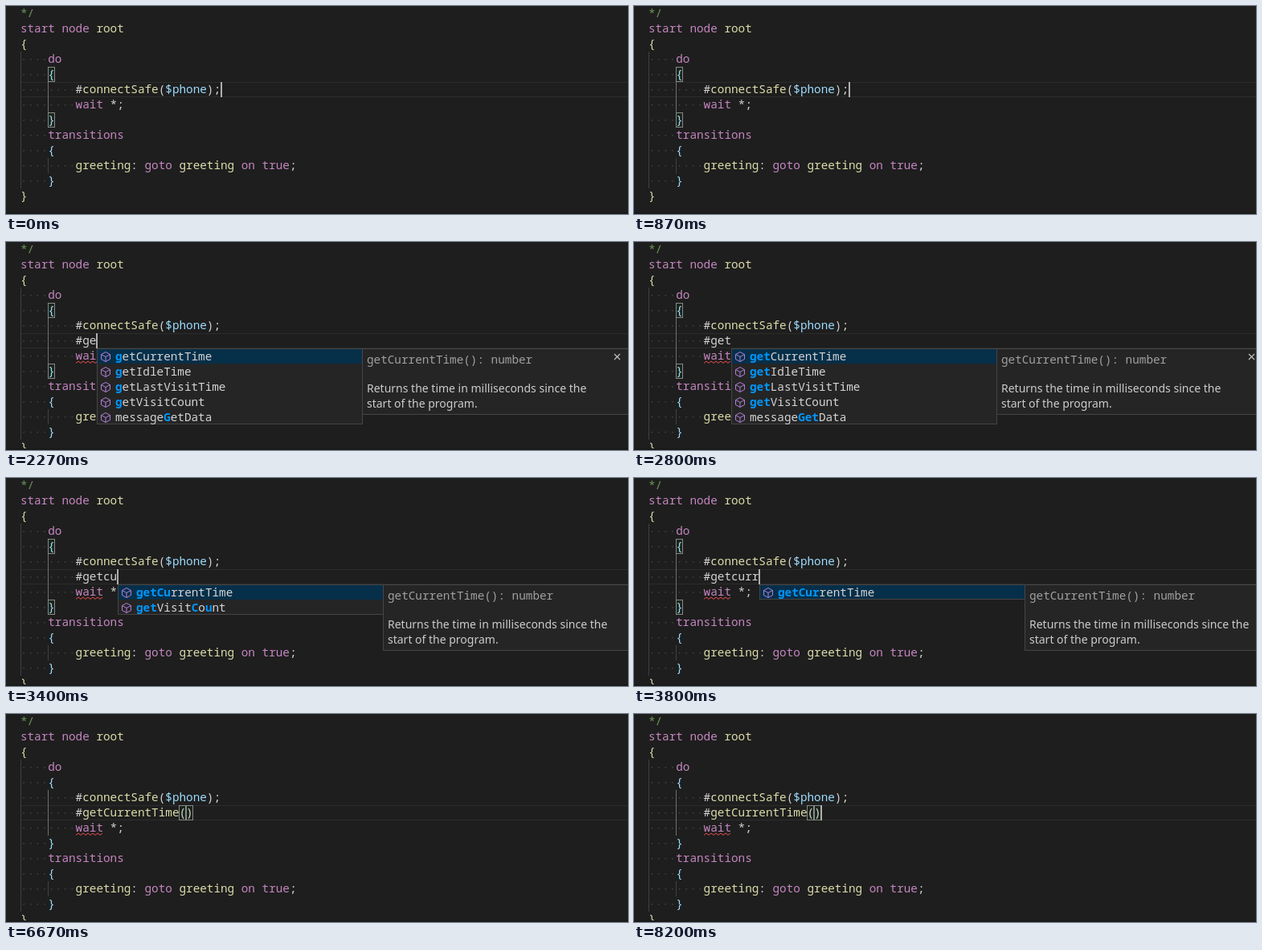
Recreate the animation shown at these times as an HTML page with a canvas. Size 774 by 260 pixels, loop 8740 ms.

```html
<!DOCTYPE html>
<html lang="en">
<head>
<meta charset="utf-8">
<title>Code completion</title>
<style>
  html, body { margin: 0; width: 100%; height: 100%; overflow: hidden; background: #1e1e1e; }
  canvas { display: block; }
</style>
</head>
<body>
<canvas id="stage" width="774" height="260"></canvas>
<script>
const ctx = document.getElementById('stage').getContext('2d');
const W = 774, H = 260, LOOP = 8740;
const X0 = 17.9, ADV = 8.59, ROW = 19, BASE = 14;
const MONO = '14.32px "Noto Sans Mono", monospace';
const SANS = '14px "Noto Sans", sans-serif';

const COLOR = {
  key: '#c586c0', fn: '#dcdcaa', va: '#9cdcfe', txt: '#d4d4d4', com: '#6a9955',
  match: '#0097fb', panel: '#252526', edge: '#454545', pick: '#062f4a'
};

// Each line: indent in columns, then [text, colour] pairs
const HEAD = [
  [0, ['*/', 'com']],
  [0, ['start node ', 'key'], ['root', 'fn']],
  [0, ['{', 'fn']],
  [4, ['do', 'key']],
  [4, ['{', 'va']],
  [8, ['#', 'txt'], ['connectSafe', 'fn'], ['(', 'txt'], ['$phone', 'va'], [');', 'txt']]
];
const TAIL = [
  [8, ['wait', 'key'], [' *;', 'txt']],
  [4, ['}', 'va']],
  [4, ['transitions', 'key']],
  [4, ['{', 'va']],
  [8, ['greeting', 'fn'], [': ', 'txt'], ['goto ', 'key'], ['greeting ', 'fn'], ['on true', 'key'], [';', 'txt']],
  [4, ['}', 'va']],
  [0, ['}', 'fn']]
];
const ITEMS = ['getCurrentTime', 'getIdleTime', 'getLastVisitTime', 'getVisitCount', 'messageGetData'];

// Time, typed text, letters already used by the suggestion filter (-1: list closed)
const STEPS = [
  [1070, '', -1], [1530, '#', -1], [1930, '#', 0],
  [2200, '#g', 0], [2270, '#ge', 1], [2330, '#get', 2], [2400, '#get', 3],
  [3270, '#getc', 3], [3330, '#getcu', 4], [3400, '#getcu', 5],
  [3600, '#getcur', 5], [3670, '#getcur', 6], [3800, '#getcurr', 6], [3870, '#getcurr', 7],
  [5200, '#getCurrentTime()', -1]
];
const CARET_OFF = [[330, 870], [2800, 3270], [4270, 4730], [5670, 6200], [6670, 7200], [7670, 8200]];

const colX = col => X0 + col * ADV;

function rect(x, y, w, h, color) {
  ctx.fillStyle = color;
  ctx.fillRect(x, y, w, h);
}

function frame(x, y, w, h, color) {
  ctx.strokeStyle = color;
  ctx.lineWidth = 1;
  ctx.strokeRect(x + 0.5, y + 0.5, w - 1, h - 1);
}

function mono(text, x, y, color, bold) {
  ctx.font = (bold ? 'bold ' : '') + MONO;
  ctx.fillStyle = color;
  [...text].forEach((ch, i) => ctx.fillText(ch, x + i * ADV, y));
}

function path(points, color, width) {
  ctx.strokeStyle = color;
  ctx.lineWidth = width;
  ctx.beginPath();
  points.forEach(([x, y]) => ctx.lineTo(x, y));
  ctx.stroke();
}

function drawLine([indent, ...parts], row) {
  for (let c = 0; c < indent; c++) {
    rect(colX(c + 0.5) - 0.8, row * ROW + 9, 1.6, 1.6, '#404040');
  }
  let col = indent;
  for (const [text, color] of parts) {
    mono(text, colX(col), row * ROW + BASE, COLOR[color]);
    col += text.length;
  }
}

function bracketBox(col, row) {
  const x = Math.round(colX(col));
  rect(x, row * ROW, 9, ROW, 'rgba(0,100,0,0.1)');
  frame(x, row * ROW, 9, ROW, '#888888');
}

function squiggle(x, y, width) {
  const points = [];
  for (let dx = 0; dx <= width; dx += 3) points.push([x + dx, y + (dx % 6 ? 0 : 2.4)]);
  path(points, '#f14c4c', 1);
}

function cube(x, y) {
  const c = '#b180d7';
  path([[x, y - 6], [x + 5.5, y - 3], [x + 5.5, y + 3], [x, y + 6], [x - 5.5, y + 3], [x - 5.5, y - 3], [x, y - 6]], c, 1);
  path([[x - 5.5, y - 3], [x, y], [x + 5.5, y - 3]], c, 1);
  path([[x, y], [x, y + 6]], c, 1);
}

// Indices of the letters in name that match the query, or null
function matches(name, query) {
  const low = name.toLowerCase();
  let at = low.indexOf('get') - 1;
  const hits = [];
  for (const ch of query) {
    at = low.indexOf(ch, at + 1);
    if (at < 0) return null;
    hits.push(at);
  }
  return hits;
}

function drawDetails(x, y) {
  rect(x, y, 338, 83, COLOR.panel);
  frame(x, y, 338, 83, COLOR.edge);
  mono('getCurrentTime(): number', x + 6, y + 19, '#a0a0a0');
  ctx.font = SANS;
  ctx.fillStyle = '#cccccc';
  ctx.fillText('Returns the time in milliseconds since the', x + 6, y + 55);
  ctx.fillText('start of the program.', x + 6, y + 74);
  const cx = x + 317.5, cy = y + 10.5, r = 3.5;
  path([[cx - r, cy - r], [cx + r, cy + r]], '#c5c5c5', 1.1);
  path([[cx + r, cy - r], [cx - r, cy + r]], '#c5c5c5', 1.1);
}

function drawList(x, y, query) {
  const found = ITEMS.map(name => [name, matches(name, query)]).filter(item => item[1]);
  const h = found.length * ROW;
  drawDetails(x + 330, y);
  rect(x, y, 330, h, COLOR.panel);
  rect(x, y, 330, ROW, COLOR.pick);
  frame(x, y, 331, h, COLOR.edge);
  found.forEach(([name, hits], i) => {
    const top = y + i * ROW;
    cube(x + 11, top + 10.5);
    [...name].forEach((ch, k) => {
      const hit = hits.includes(k);
      mono(ch, x + 23 + k * ADV, top + 15, hit ? COLOR.match : COLOR.txt, hit);
    });
  });
}

function draw(t) {
  const step = STEPS.filter(s => s[0] <= t).pop();
  const typed = step ? step[1] : '';
  const added = step ? 1 : 0;
  const row = 5 + added;
  const caretCol = step ? 8 + typed.length : 29;

  rect(0, 0, W, H, '#1e1e1e');
  rect(18, row * ROW, W - 18, 1, '#2c2c2c');
  rect(18, row * ROW + ROW - 1, W - 18, 1, '#2c2c2c');

  const lines = [...HEAD];
  if (step) {
    const name = typed.slice(1).replace('()', '');
    lines.push([8, [typed.slice(0, 1), 'txt'], [name, t < 5530 ? 'txt' : 'fn'], [typed.slice(1 + name.length), 'txt']]);
  }
  lines.push(...TAIL);

  rect(18, 3 * ROW, 1, (9 + added) * ROW, '#404040');
  rect(52, 5 * ROW, 1, (2 + added) * ROW, '#707070');
  rect(52, (10 + added) * ROW, 1, ROW, '#404040');

  if (t < 5270) {
    bracketBox(4, 4);
    bracketBox(4, 7 + added);
  } else {
    bracketBox(23, 6);
    bracketBox(24, 6);
  }

  lines.forEach(drawLine);
  if (t >= 1800) squiggle(87, 149, 34);
  rect(0, 258, W, 2, '#191919');

  if (step && step[2] >= 0) {
    drawList(Math.ceil(colX(caretCol)), 7 * ROW, typed.slice(1, 1 + step[2]));
  }
  if (!CARET_OFF.some(([a, b]) => t >= a && t < b)) {
    rect(Math.floor(colX(caretCol)), row * ROW, 2, ROW, '#aeafad');
  }
}

const start = performance.now();
function tick() {
  draw((performance.now() - start) % LOOP);
  requestAnimationFrame(tick);
}
tick();
</script>
</body>
</html>
```
